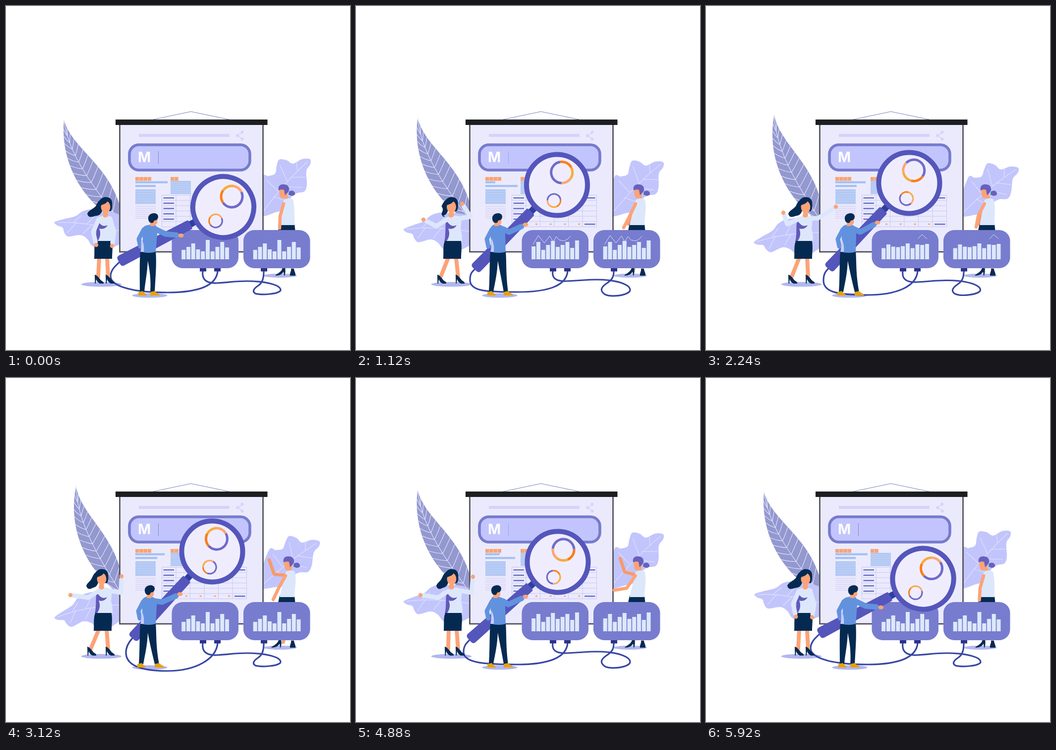
Write an HTML page that moves like this. It is 694 px wide and 694 px high and loops after 6 s.

```html
<!DOCTYPE html>
<html lang="en">
<head>
<meta charset="utf-8">
<title>Data research</title>
<style>
html, body { margin: 0; width: 100%; height: 100%; overflow: hidden; background: #fff; }
svg { display: block; width: 100vw; height: 100vh; }
.limb { fill: none; stroke-linecap: round; stroke-linejoin: round; }
.skin { fill: #fca377; }
.navy { fill: #052a52; }
.cloth { fill: #dde7fb; }
.pale { fill: #c2c5fc; }
.vein { fill: none; stroke: #dfe1fb; stroke-width: 1.2; stroke-linecap: round; }
.cable { fill: none; stroke: #3646a5; stroke-width: 3.2; }
.shade { fill: #b1b7ef; }
.grid { fill: none; stroke: #c6c8f2; stroke-width: 1; }
</style>
</head>
<body>
<svg viewBox="0 0 694 694">
  <g id="leafL"></g>
  <g id="leafS"></g>
  <g id="leafR"></g>

  <path d="M297 229L373 213L450 229" fill="none" stroke="#7a7dc6"/>
  <rect x="229.5" y="236" width="289" height="260" fill="#ebeafd" stroke="#4b4b55" stroke-width="2.6"/>
  <rect x="221" y="229" width="306.500" height="11" fill="#1d1e20"/>
  <rect x="268" y="258" width="183" height="6" fill="#d6d2f9"/>
  <g fill="#d6d2f9" stroke="#d6d2f9" stroke-width="1.500">
    <path d="M477 255L467 261.500L477 268" fill="none"/>
    <circle cx="476.500" cy="254.500" r="2.200"/><circle cx="467" cy="261.500" r="2.200"/><circle cx="476.500" cy="268.500" r="2.200"/>
  </g>
  <rect x="249" y="280" width="243" height="51" rx="19" fill="#c2c5fd" stroke="#777bcd" stroke-width="5.600"/>
  <text x="266" y="315.300" font-family="Inter, 'Open Sans', sans-serif" font-weight="700" font-size="28" fill="#fff">M</text>
  <path id="caret" d="M307.500 293V318" stroke="#8285cf"/>
  <g id="page"></g>
  <rect id="row1" x="261" y="353.500" height="4.200" fill="#a3c0f3"/>
  <rect id="row2" x="261" y="361" height="4.200" fill="#a3c0f3"/>

  <ellipse class="shade" cx="553" cy="544" rx="34" ry="4"/>
  <g id="guide">
    <path id="gArmB" class="limb" stroke="#f79a6c" stroke-width="6.500"/>
    <path class="skin" d="M557 524H565L562 536H556ZM574 524H581L580 534H576Z"/>
    <path id="gShoe" class="navy" d="M4 -14L9 -15C10 -10 10 -5 8 1H7L6 -7C3 -2 -2 1 -11 1C-10 -2 0 -4 4 -14Z"/>
    <path class="navy" d="M575 530L581 530C581 535 585 539 584 544H573C572 539 576 535 575 530Z"/>
    <path class="navy" d="M552 439H582L584 458H548Z"/>
    <path id="gNeck" class="limb" stroke="#fca377" stroke-width="7"/>
    <path id="gVest" class="cloth"/>
    <g id="gHead">
      <path class="skin" d="M-9 1C-9 10 -8 19 -3 20C4 21 8 14 9 5L3 -3Z"/>
      <path fill="#6960bd" d="M-10 4C-12 -6 -5 -9 1 -8C9 -8 12 -2 11 4C9 9 5 11 3 14L1 3C-2 2 -6 2 -10 4Z"/>
      <path fill="#6960bd" d="M12 6C17 2 24 6 23 12C20 16 14 16 11 12Z"/>
      <path d="M12 6L11 13" stroke="#327a9e" stroke-width="2"/>
    </g>
    <path id="gArmF" class="limb" stroke="#fca377" stroke-width="6.500"/>
  </g>

  <ellipse class="shade" cx="192.500" cy="561.500" rx="41" ry="4.800"/>
  <ellipse class="shade" cx="290" cy="584" rx="35.500" ry="4.600"/>
  <path id="cord1" class="cable"/>
  <path id="cord2" class="cable"/>
  <path d="M391 529h13v6.500h-13zM420 529h13v6.500h-13zM514 529h13v6.500h-13z" fill="#2b3288"/>
  <g class="panel"></g>
  <g class="panel" transform="translate(144.500)"></g>

  <g id="loupe">
    <rect x="62" y="-6.500" width="20" height="13" fill="#2f3f9f"/>
    <path d="M78 -10L232 -11.500Q238 -11 238 -5V5Q238 11 232 11.500L78 10Q75 10 75 7V-7Q75 -10 78 -10Z" fill="#5456bb"/>
    <circle r="61.500" fill="#efedfd" stroke="#5456bb" stroke-width="10"/>
    <g transform="rotate(-152.300)">
      <g transform="translate(17 -21)"><g id="ring1"></g></g>
      <g transform="translate(-15.500 28)"><g id="ring2"></g></g>
    </g>
  </g>

  <g id="man">
    <path id="mPants" class="navy"/>
    <path id="mShoeL" d="M-8 8V1L1 -1C4 4 9 4 9 8Z" fill="#e5a20c"/>
    <path id="mShoeR" d="M-9 8V1L0 -1C4 4 10 4 10 8Z" fill="#e5a20c"/>
    <path id="mArmB" class="limb" stroke="#6292de" stroke-width="9"/>
    <path id="mBody" fill="#6292de"/>
    <path d="M273 469C278 477 279 487 278 496H271C274 486 272 478 273 469Z" fill="#c5cdf8"/>
    <g id="mHead">
      <path class="skin" d="M-7 3L8 1C9 8 8 11 3 11L3 14H-6V9Z"/>
      <path class="navy" d="M-10 0C-11 -8 -5 -12 2 -12C8 -12 12 -7 9 -1C7 3 4 2 2 3L0 7C-4 9 -9 7 -10 0Z"/>
    </g>
    <path id="mArmF" class="limb" stroke="#6292de" stroke-width="11"/>
    <ellipse id="mHand" class="skin" rx="5.500" ry="4"/>
  </g>

  <g id="lady">
    <path id="wLegs" class="limb" stroke="#fca377" stroke-width="8"/>
    <path id="wShoeL" class="navy shoe"/>
    <path id="wShoeR" class="navy shoe"/>
    <g id="wBody">
      <path class="cloth" d="M185 428C192 421 209 421 215 428L213 450C216 460 217 470 215 478H179C181 465 185 455 183 445Z"/>
      <path d="M184 431C190 443 197 446 205 442C202 449 194 451 188 449C192 458 190 467 185 474L180 475C184 460 181 444 184 431Z" fill="#6259ba"/>
      <path class="navy" d="M181 474H214C216 488 214 498 214 510H178C179 495 177 485 181 474Z"/>
    </g>
    <path id="wHair" class="navy"/>
    <g id="wHead">
      <path class="skin" d="M-4 10H4L5 20C3 25 -5 25 -6 20Z"/>
      <ellipse class="skin" cy="2" rx="9.500" ry="12"/>
      <path class="navy" d="M-11 0C-12 -19 13 -21 13 -2L11 8C11 0 8 -6 4 -9C0 -3 -6 -3 -9 -1Z"/>
    </g>
    <path id="wArmL" class="limb" stroke="#dde7fb" stroke-width="9"/>
    <path id="wArmR" class="limb" stroke="#dde7fb" stroke-width="9"/>
    <circle id="wHandL" class="skin" r="4.200"/>
    <circle id="wHandR" class="skin" r="4.200"/>
  </g>
</svg>
<script>
const LOOP = 6000, STEP = 80;
const $ = id => document.getElementById(id);
const set = (id, attrs) => { for (const k in attrs) $(id).setAttribute(k, attrs[k]); };
const move = (id, x, y) => set(id, { transform: `translate(${x} ${y})` });
const lerp = (a, b, p) => a + (b - a) * p;
const ease = (a, b, t) => { const p = Math.min(1, Math.max(0, (t - a) / (b - a))); return p * p * (3 - 2 * p); };
const add = (parent, html) => parent.insertAdjacentHTML('beforeend', html);

// Monotone cubic track through timed values
function track(times, v) {
  const d = v.slice(1).map((x, i) => (x - v[i]) / (times[i + 1] - times[i]));
  const m = v.map((_, i) => i && i < d.length && d[i - 1] * d[i] > 0
    ? 2 * d[i - 1] * d[i] / (d[i - 1] + d[i]) : 0);
  return t => {
    let i = 0;
    while (i < d.length - 1 && t >= times[i + 1]) i++;
    const h = times[i + 1] - times[i], p = (t - times[i]) / h, q = 1 - p;
    return v[i] * (1 + 2 * p) * q * q + m[i] * h * p * q * q
      + v[i + 1] * p * p * (3 - 2 * p) - m[i + 1] * h * p * p * q;
  };
}
const POSES = [0, 1120, 2240, 3120, 4160, 4880, LOOP];
const key = (...v) => track(POSES, [...v, v[0]]);
const point = (...xy) => {
  const x = key(...xy.map(p => p[0])), y = key(...xy.map(p => p[1]));
  return t => [x(t), y(t)];
};
const limb = (id, ...pts) => set(id, { d: 'M' + pts.map(p => p.join(' ')).join('L') });

// Closed smooth outline through points
function blob(p) {
  const n = p.length, at = i => p[(i + n) % n];
  let d = 'M' + p[0];
  for (let i = 0; i < n; i++) {
    const [a, b, c, e] = [-1, 0, 1, 2].map(k => at(i + k));
    d += `C${b[0] + (c[0] - a[0]) / 6} ${b[1] + (c[1] - a[1]) / 6} ${c[0] - (e[0] - b[0]) / 6} ${c[1] - (e[1] - b[1]) / 6} ${c}`;
  }
  return d + 'Z';
}
const cubic = (p, t) => [0, 1].map(k => {
  const u = 1 - t;
  return u * u * u * p[0][k] + 3 * u * u * t * p[1][k] + 3 * u * t * t * p[2][k] + t * t * t * p[3][k];
});

function drawLeaves() {
  const tip = [117, 230], base = [238, 443];
  const right = [tip, [135, 295], [225, 325], base];
  const left = [tip, [110, 300], [140, 390], base];
  const rib = [tip, [125, 295], [170, 360], base];
  let veins = `M${rib[0]}C${rib.slice(1).join(' ')}`;
  for (let t = 0.17; t < 0.95; t += 0.065)
    for (const side of [left, right]) {
      const a = cubic(rib, t), b = cubic(side, t - 0.085);
      veins += `M${a}Q${(a[0] + b[0]) / 2} ${(a[1] + b[1]) / 2 + 2} ${b}`;
    }
  add($('leafL'), `<path d="M${tip}C${right.slice(1).join(' ')}C${left[2]} ${left[1]} ${tip}Z" fill="#9398cf"/><path class="vein" d="${veins}"/>`);

  const low = [[98, 436], [116, 430], [140, 424], [157, 413], [182, 411], [232, 424], [240, 470],
    [222, 484], [195, 491], [174, 484], [164, 470], [150, 462], [126, 465], [118, 458], [114, 447], [104, 443]];
  add($('leafS'), `<path class="pale" d="${blob(low)}"/><path class="vein" d="M104 437Q160 434 238 456M136 436L152 423M164 439L182 420M143 436L124 457M174 441L156 459M200 446L180 479M196 445L212 426"/>`);

  const up = [[613, 309], [597, 309], [579, 318], [566, 311], [551, 310], [546, 323], [543, 338], [530, 343],
    [516, 347], [508, 420], [545, 416], [568, 406], [574, 388], [586, 378], [602, 374], [607, 360], [606, 333], [614, 319]];
  add($('leafR'), `<path class="pale" d="${blob(up)}"/><path class="vein" d="M608 314Q560 358 515 420M588 332L586 316M567 353L553 322M549 373L526 352M574 346L604 345M557 364L598 366M540 385L568 394"/>`);
}

function drawPage() {
  const rect = (x, y, w, h, c) => add($('page'), `<rect x="${x}" y="${y}" width="${w}" height="${h}" fill="${c}"/>`);
  for (const x of [261, 269.2, 277.4, 285.600, 332, 340.2]) rect(x, 345, 7.500, 7.500, '#fca26f');
  for (let y = 370; y < 399; y += 2.5) rect(261, y, 41, 1.7, '#9dbcf0');
  for (let y = 403.500; y < 430; y += 4) rect(261, y, 41, 1.3, '#d5d0f6');
  for (let y = 353; y < 378; y += 2.7) rect(332, y, 41, 1.8, '#9dbcf0');
  let d = 'M314.500 381.500H485.500V445.500H314.500Z';
  for (let i = 1; i < 6; i++) d += `M${314.5 + i * 28.5} 381.500V445.500M314.500 ${381.5 + i * 10.67}H485.500`;
  add($('page'), `<path class="grid" d="${d}"/>`);
  for (let i = 0; i < 5; i++) rect(317.5, 386 + i * 10.7, 21.5, 2.4, '#606bc5');
  for (const y of [386, 439]) rect(461, y, 21.5, 2.4, '#606bc5');
  for (let i = 0; i < 4; i++) rect(362 + i * 28.7, 438.7, 4, 2.8, '#fba676');
}

const topsA = [492, 486, 479, 491, 495, 472, 495, 486, 476, 487];
const topsB = [485, 476, 492, 482, 474, 486, 482, 476, 488, 473];
function drawPanels() {
  for (const g of document.querySelectorAll('.panel')) {
    add(g, '<rect x="334.500" y="452" width="134.500" height="77" rx="22" fill="#777cce"/>');
    topsA.forEach((_, i) => add(g, `<rect class="bar" x="${354.2 + i * 9.75}" width="8" fill="#dce8fb"/>`));
    add(g, '<path class="trend" pathLength="100" d="M357 481L368 463L380 478L391 464L398 476L404 465L410 472L420 474L427 470L436 461L446 470" fill="none" stroke="#dbe1fb"/>');
  }
}

function drawRing(id, r, w) {
  const arc = (c, from, len) => add($(id), `<circle r="${r}" fill="none" stroke="${c}" stroke-width="${w}" pathLength="360" stroke-dasharray="${len} 360" stroke-dashoffset="${-from}"/>`);
  arc('#706bca', 190, 170);
  arc('#fb7d19', 0, 70);
  arc('#f7ac3a', 70, 65);
  arc('#fda672', 135, 55);
}

const rowTimes = [0, 120, 700, 1120, 1500, 1880, 2240, 2700, 3000];
const row1 = track(rowTimes, [65, 59, 26, 20, 20, 29, 61, 65, 65]);
const row2 = track(rowTimes, [41, 44, 61, 65, 65, 60, 43, 41, 41]);

const lens = point([438.5, 405.5], [405.5, 361], [410, 357], [416, 350], [403, 365], [407, 371]);
const tilt = key(152.3, 134.3, 133.4, 132.6, 135.7, 138.5);
const cordX = key(211, 230, 237, 242, 220, 217);
const cordY = key(545, 553, 554, 554, 553, 553);
const sag = key(578, 577, 583, 591, 579, 578);

const man = {
  head: key(297, 285, 290, 290, 288, 283),
  chest: key(275, 271, 273, 274, 271, 271),
  elbow: point([322, 460], [309, 456], [311, 456], [315, 452], [309, 455], [307, 457]),
  hand: point([353, 463], [342, 441], [346, 437], [351, 436], [341, 439], [342, 441]),
  footL: key(275, 273, 273, 273, 273, 273),
  footR: key(296, 303, 305, 305, 304, 303)
};
const lady = {
  head: key(201, 192.500, 201, 193, 202, 193),
  tail: key(-37, -20, -35, -31, -37, -31),
  body: key(0, -2, 0, -1, 0, -1),
  elbowL: point([176, 456], [162, 444], [164, 440], [166, 443], [164, 440], [166, 443]),
  handL: point([182, 482], [136, 431], [156, 417], [130, 438], [156, 417], [130, 438]),
  elbowR: point([218, 456], [231, 425], [226, 428], [232, 433], [226, 428], [233, 433]),
  handR: point([214, 484], [214, 399], [262, 405], [233, 400], [263, 405], [236, 401]),
  foot: key(187, 172, 174, 172, 176, 187)
};
const guide = {
  head: key(560, 570, 564, 570, 573, 569),
  elbowF: point([553, 424], [552, 424], [549, 424], [550, 424], [547, 414], [546, 424]),
  handF: point([552, 448], [540, 447], [545, 446], [539, 447], [520, 406], [521, 428]),
  elbowB: point([556, 420], [556, 420], [555, 420], [541, 396], [542, 389], [542, 391]),
  handB: point([555, 440], [550, 440], [551, 440], [531, 367], [525, 375], [533, 364]),
  shoe: key(554, 552, 553, 546, 547, 553)
};

// Stops a sleeve just short of the hand
const cuff = (e, h, gap) => {
  const dx = h[0] - e[0], dy = h[1] - e[1], k = 1 - gap / Math.hypot(dx, dy);
  return [e[0] + dx * k, e[1] + dy * k];
};

function drawPage2(t) {
  const phase = t % 3000;
  set('caret', { opacity: (1 + Math.cos(t / 1500 * 2 * Math.PI)) / 2 });
  set('row1', { width: row1(phase) });
  set('row2', { width: row2(phase) });

  const q = ease(400, 1100, phase) * (1 - ease(1880, 2600, phase));
  document.querySelectorAll('.bar').forEach((bar, i) => {
    const y = lerp(topsA[i % 10], topsB[i % 10], q);
    bar.setAttribute('y', y);
    bar.setAttribute('height', 511 - y);
  });
  const from = 100 * ease(1400, 2560, t), to = 100 * ease(160, 1400, t);
  document.querySelectorAll('.trend').forEach(line => {
    line.setAttribute('stroke-dasharray', `${Math.max(0, to - from)} 300`);
    line.setAttribute('stroke-dashoffset', -from);
    line.setAttribute('visibility', to - from > 0.1 ? 'visible' : 'hidden');
  });
  const m = (a, b) => lerp(a, b, q);
  set('cord2', { d: `M397 535C395 ${m(550, 548)} 402 ${m(560, 556)} 425 ${m(559, 555)}C455 ${m(557, 554)} 462 ${m(555, 552)} 485 ${m(555, 552)}C${m(525, 530)} ${m(555, 552)} ${m(554, 553)} 563 ${m(554, 553)} 573C${m(553, 552)} ${m(581, 584)} ${m(515, 512)} ${m(584, 589)} ${m(503, 501)} ${m(580, 581)}C${m(496, 492)} ${m(576, 574)} ${m(500, 494)} ${m(570, 568)} ${m(509, 505)} ${m(564, 560)}C518 ${m(558, 552)} 520 ${m(548, 545)} 520 535` });
}

function drawLoupe(t) {
  const [x, y] = lens(t), a = tilt(t), r = a * Math.PI / 180;
  set('loupe', { transform: `translate(${x} ${y}) rotate(${a})` });
  set('ring1', { transform: `rotate(${145 + 0.12 * t})` });
  set('ring2', { transform: `rotate(${145 - 0.12 * t})` });
  const ex = x + 234 * Math.cos(r), ey = y + 234 * Math.sin(r), cx = cordX(t), cy = cordY(t), b = sag(t);
  set('cord1', { d: `M${ex} ${ey}C${ex - 8} ${ey + 8} ${cx} ${cy - 14} ${cx} ${cy}C${cx} ${cy + 23} 265 ${b} 325 ${b}C385 ${b} 424 566 427 535` });
}

function drawMan(t) {
  const h = man.head(t), s = man.chest(t), l = man.footL(t), r = man.footR(t);
  const e = man.elbow(t), hand = man.hand(t);
  set('mPants', { d: `M271 494H302C304 520 302 540 ${r + 4} 577H${r - 5}C293 548 289 530 286 514C285 540 281 555 ${l + 4} 577H${l - 5}C270 550 269 520 271 494Z` });
  move('mShoeL', l, 576);
  move('mShoeR', r + 4, 576);
  limb('mArmB', [s + 3, 451], [s - 7, 470], [s - 4, 485]);
  set('mBody', { d: `M${s} 450C${s + 3} 441 ${h - 8} 442 ${h - 5} 441H${h + 3}C${s + 29} 443 ${s + 32} 450 ${s + 30} 460L302 496Q288 500 273 496L${s + 1} 470Z` });
  move('mHead', h, 430);
  limb('mArmF', [s + 26, 450], e, cuff(e, hand, 9));
  set('mHand', { cx: hand[0], cy: hand[1] });
}

function drawLady(t) {
  const h = lady.head(t), b = lady.body(t), f = lady.foot(t), k = lady.tail(t);
  const eL = lady.elbowL(t), hL = lady.handL(t), eR = lady.elbowR(t), hR = lady.handR(t);
  set('wLegs', { d: `M${188 + b} 508L${f - 1} 546M${204 + b} 508L206 546` });
  move('wShoeL', f, 558);
  move('wShoeR', 209, 558);
  move('wBody', b, 0);
  set('wHair', { transform: `translate(${h} 404)`, d: `M-11 -13C-6 -21 11 -21 13 -9C14 0 13 8 10 10L-7 8C-8 14 -12 18 -17 19C${k + 11} 20 ${k + 3} 26 ${k} 15C${k + 3} 8 ${k * 0.6 - 4} 6 -20 0C-17 -6 -16 -9 -11 -13Z` });
  move('wHead', h, 403);
  limb('wArmL', [187 + b, 430], eL, cuff(eL, hL, 6));
  limb('wArmR', [210 + b, 429], eR, cuff(eR, hR, 6));
  set('wHandL', { cx: hL[0], cy: hL[1] });
  set('wHandR', { cx: hR[0], cy: hR[1] });
}

function drawGuide(t) {
  const h = guide.head(t), s = 561 + (h - 560) * 0.4;
  limb('gArmB', [s + 2, 398], guide.elbowB(t), guide.handB(t));
  limb('gArmF', [s - 1, 399], guide.elbowF(t), guide.handF(t));
  limb('gNeck', [h + 3, 380], [s + 8, 393]);
  set('gVest', { d: `M${s - 1} 392C${s + 4} 387 ${s + 15} 387 ${s + 18} 391C${s + 22} 408 582 425 582 442H552C556 426 ${s - 5} 408 ${s - 1} 392Z` });
  move('gHead', h, 368);
  move('gShoe', guide.shoe(t), 543);
}

function render(t) {
  const sway = (1 - Math.cos(t / LOOP * 2 * Math.PI)) / 2;
  set('leafL', { transform: `rotate(${6.400 * sway} 238 443)` });
  set('leafS', { transform: `rotate(${-19 * sway} 240 460)` });
  set('leafR', { transform: `rotate(${11 * sway} 515 420)` });
  drawPage2(t);
  drawLoupe(t);
  drawMan(t);
  drawLady(t);
  drawGuide(t);
}

drawLeaves();
drawPage();
drawPanels();
drawRing('ring1', 21.5, 5);
drawRing('ring2', 13.3, 3.2);
document.querySelectorAll('.shoe').forEach(s =>
  s.setAttribute('d', 'M-8 -16C-4 -15 0 -11 4 -5C8 -2 11 -1 10 2H3C-2 0 -4 -4 -5 -7L-6 2H-7.500Z'));

const start = performance.now();
function tick() {
  const t = (performance.now() - start) % LOOP;
  render(Math.floor(t / STEP) * STEP);
  requestAnimationFrame(tick);
}
tick();
</script>
</body>
</html>
```
